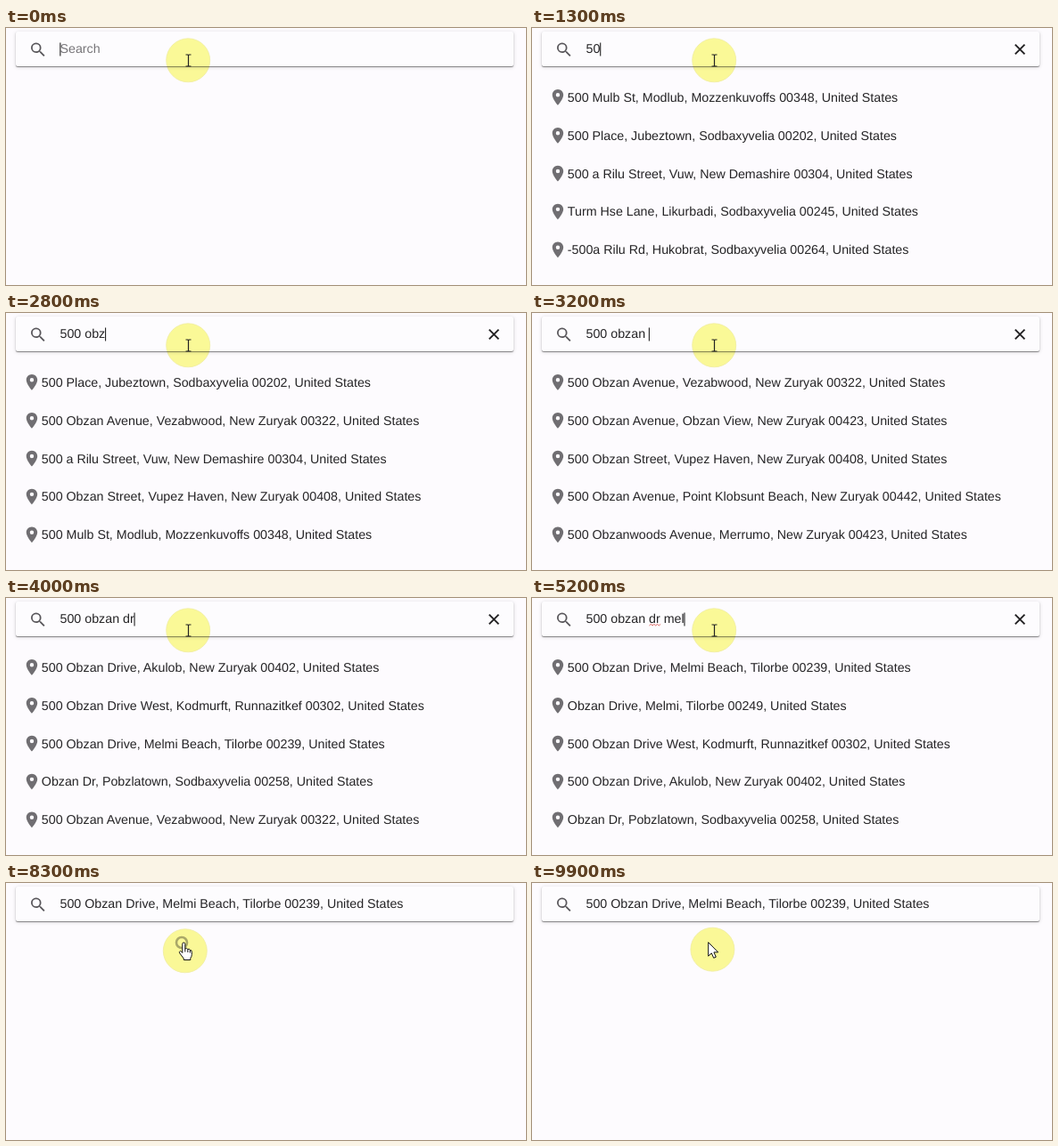
Recreate the animation shown at these times as an HTML page. Size 583 by 289 pixels, loop 10 s.

```html
<!DOCTYPE html>
<html lang="en">
<head>
<meta charset="utf-8">
<title>Address search</title>
<style>
  html, body { margin: 0; width: 100%; height: 100%; overflow: hidden; background: #fdfbfe; }
  .bar {
    position: absolute; left: 11px; top: 4px; width: 557.5px; height: 39px; border-radius: 2px;
    background: #fdfcfe;
    box-shadow: 0 1px 1px rgba(0,0,0,.42), 0 1px 4px rgba(0,0,0,.17);
  }
  svg { position: absolute; left: 0; top: 0; width: 583px; height: 289px; }
  text {
    font: 14.26px "Liberation Sans", Arial, sans-serif;
    fill: #252426; white-space: pre; text-rendering: geometricPrecision;
  }
  #placeholder { fill: #777579; }
  .squiggle { fill: none; stroke: #d8544f; stroke-width: .9; }
  #halo { mix-blend-mode: multiply; fill: #fcfc98; stroke: #f1f0a0; stroke-width: .8; }
  .cursor { fill: #fff; stroke: #111; stroke-width: 1; stroke-linejoin: round; }
</style>
</head>
<body>
<div class="bar"></div>
<svg viewBox="0 0 583 289">
  <defs>
    <path id="pin" d="M12 2C8.13 2 5 5.13 5 9c0 5.25 7 13 7 13s7-7.75 7-13c0-3.87-3.13-7-7-7zm0 9.5a2.5 2.5 0 0 1 0-5 2.5 2.5 0 0 1 0 5z"/>
  </defs>
  <path transform="translate(25.3 13.8) scale(.89)" fill="#59575b" d="M15.5 14h-.79l-.28-.27A6.47 6.47 0 0 0 16 9.5 6.5 6.5 0 1 0 9.5 16c1.61 0 3.09-.59 4.23-1.57l.27.28v.79l5 4.99L20.49 19zm-6 0a4.5 4.5 0 1 1 0-9 4.5 4.5 0 0 1 0 9z"/>
  <path id="clear" d="M541.7 18.6l10.7 10.7m0-10.7l-10.7 10.7" stroke="#1c1b1d" stroke-width="1.8"/>
  <text id="placeholder" x="60.5" y="28.4">Search</text>
  <text id="query" x="60.5" y="28.4"></text>
  <path id="squiggle1" class="squiggle"/>
  <path id="squiggle2" class="squiggle"/>
  <rect id="caret" y="16.5" width="1.1" height="15" fill="#222"/>
  <g id="list"></g>
  <circle id="halo" r="24.5"/>
  <circle id="ring" cx="197" cy="67" fill="none" stroke="#8f8e58" stroke-width="2.6"/>
  <path id="beam" fill="none" stroke="#222" stroke-width="1.2" d="M-3 -6.5H-1Q0 -6.5 0 -5.5Q0 -6.5 1 -6.5H3M0 -5.5V5.5M-3 6.5H-1Q0 6.5 0 5.5Q0 6.5 1 6.5H3"/>
  <path id="hand" class="cursor" d="M4 2Q4 .5 5.5 .5T7 2V7.5Q9 6 10 8Q12 7 12.5 9Q14.5 8.5 14.5 11V14Q14.5 16 13 18V20H5.5V18.5L1 12.5Q0 10.5 1.5 10Q2.5 9.8 4 12ZM7 7.5V11M10 8V11.5M12.5 9V12"/>
  <path id="arrow" class="cursor" d="M0 0V15.5L3.6 12.2 6 17.6 8.6 16.5 6.2 11.2H11Z"/>
</svg>
<script>
const $ = id => document.getElementById(id);
const show = (id, on) => { $(id).style.display = on ? '' : 'none'; };
const place = (id, x, y) => $(id).setAttribute('transform', `translate(${x} ${y})`);

const rows = {
  hall: '500 a Rilu Street, Vuw, New Demashire 00304',
  hallRd: '-500a Rilu Rd, Hukobrat, Sodbaxyvelia 00264',
  place: '500 Place, Jubeztown, Sodbaxyvelia 00202',
  farm: 'Turm Hse Lane, Likurbadi, Sodbaxyvelia 00245',
  main: '500 Mulb St, Modlub, Mozzenkuvoffs 00348',
  wood: '500 Obzan Avenue, Vezabwood, New Zuryak 00322',
  view: '500 Obzan Avenue, Obzan View, New Zuryak 00423',
  haven: '500 Obzan Street, Vupez Haven, New Zuryak 00408',
  point: '500 Obzan Avenue, Point Klobsunt Beach, New Zuryak 00442',
  woods: '500 Obzanwoods Avenue, Merrumo, New Zuryak 00423',
  beach: '500 Obzan Drive, Melmi Beach, Tilorbe 00239',
  city: 'Obzan Drive, Melmi, Tilorbe 00249',
  west: '500 Obzan Drive West, Kodmurft, Runnazitkef 00302',
  drive: '500 Obzan Drive, Akulob, New Zuryak 00402',
  town: 'Obzan Dr, Pobzlatown, Sodbaxyvelia 00258'
};

// [start ms, row keys]
const lists = [
  [0, ''],
  [1000, 'main place hall farm hallRd'],
  [1400, 'place hall main hallRd farm'],
  [1800, 'hall hallRd place farm main'],
  [2500, 'place wood hall haven main'],
  [3000, 'wood view haven point woods'],
  [3600, 'drive wood west view haven'],
  [4000, 'drive west beach town wood'],
  [5200, 'beach city west drive town'],
  [8000, '']
];

const phrase = '500 obzan dr melmi';
const keyTimes = [1000, 1300, 1700, 2200, 2400, 2600, 2800, 2900, 3000, 3200,
                  3500, 3800, 4400, 4700, 5000, 5200, 5500, 5900];
const full = key => rows[key] + ', United States';

const lines = Array.from({ length: 5 }, (_, i) => {
  const y = 78 + i * 42.85;
  $('list').insertAdjacentHTML('beforeend',
    `<use href="#pin" fill="#706e72" transform="translate(18.3 ${y - 10.7}) scale(.89)"/>` +
    `<text x="39.8" y="${y + 4.9}"></text>`);
  return $('list').lastElementChild;
});

function zigzag(id, from, to) {
  let d = `M${from} 31`;
  for (let x = from + 1.8, i = 0; x <= to; x += 1.8, i++) d += `L${x} ${i % 2 ? 31 : 29.4}`;
  $(id).setAttribute('d', d);
}
zigzag('squiggle1', 131.5, 144.5);
zigzag('squiggle2', 148.5, 186.5);

const within = (t, a, b) => t >= a && t < b;
const ramp = (t, a, b) => Math.min(1, Math.max(0, (t - a) / (b - a)));
const ease = p => p * p * (3 - 2 * p);

function drawField(t) {
  const picked = t >= 8000;
  const text = picked ? full('beach') : phrase.slice(0, keyTimes.filter(k => k <= t).length);
  if ($('query').textContent !== text) $('query').textContent = text;
  show('placeholder', !text);
  show('clear', text && !picked);
  show('squiggle1', within(t, 4400, 8000));
  show('squiggle2', within(t, 6000, 8000));
  show('caret', t < 7500 && !within(t, 300, 800) && !within(t, 6500, 7000));
  $('caret').setAttribute('x', 60.3 + (text ? $('query').getComputedTextLength() : 0));
}

function drawList(t) {
  const keys = lists.filter(([start]) => start <= t).pop()[1];
  show('list', keys);
  if (keys) keys.split(' ').forEach((key, i) => {
    if (lines[i].textContent !== full(key)) lines[i].textContent = full(key);
  });
}

function drawPointer(t) {
  const down = ease(ramp(t, 7400, 7900));
  const settle = ramp(t, 8500, 8600);
  const x = 204.2 - 3.4 * down + 1.6 * settle;
  const y = 36.3 + 40 * down - 1.6 * settle;
  const kind = t >= 8600 ? 'arrow' : y > 48 ? 'hand' : 'beam';
  for (const id of ['beam', 'hand', 'arrow']) show(id, id === kind);
  place('halo', x, y);
  place('beam', x + .3, y + .2);
  place('hand', x - 7, y - 9.8);
  place('arrow', x - 4.7, y - 8);
  show('ring', within(t, 8000, 8600));
  $('ring').setAttribute('r', 2 + 4 * ramp(t, 8000, 8300));
  $('ring').style.opacity = .75 * (1 - ramp(t, 8300, 8600));
}

let start;
function tick() {
  const now = performance.now();
  start ??= now;
  const t = (now - start) % 10000;
  drawField(t);
  drawList(t);
  drawPointer(t);
  requestAnimationFrame(tick);
}
tick();
</script>
</body>
</html>
```
